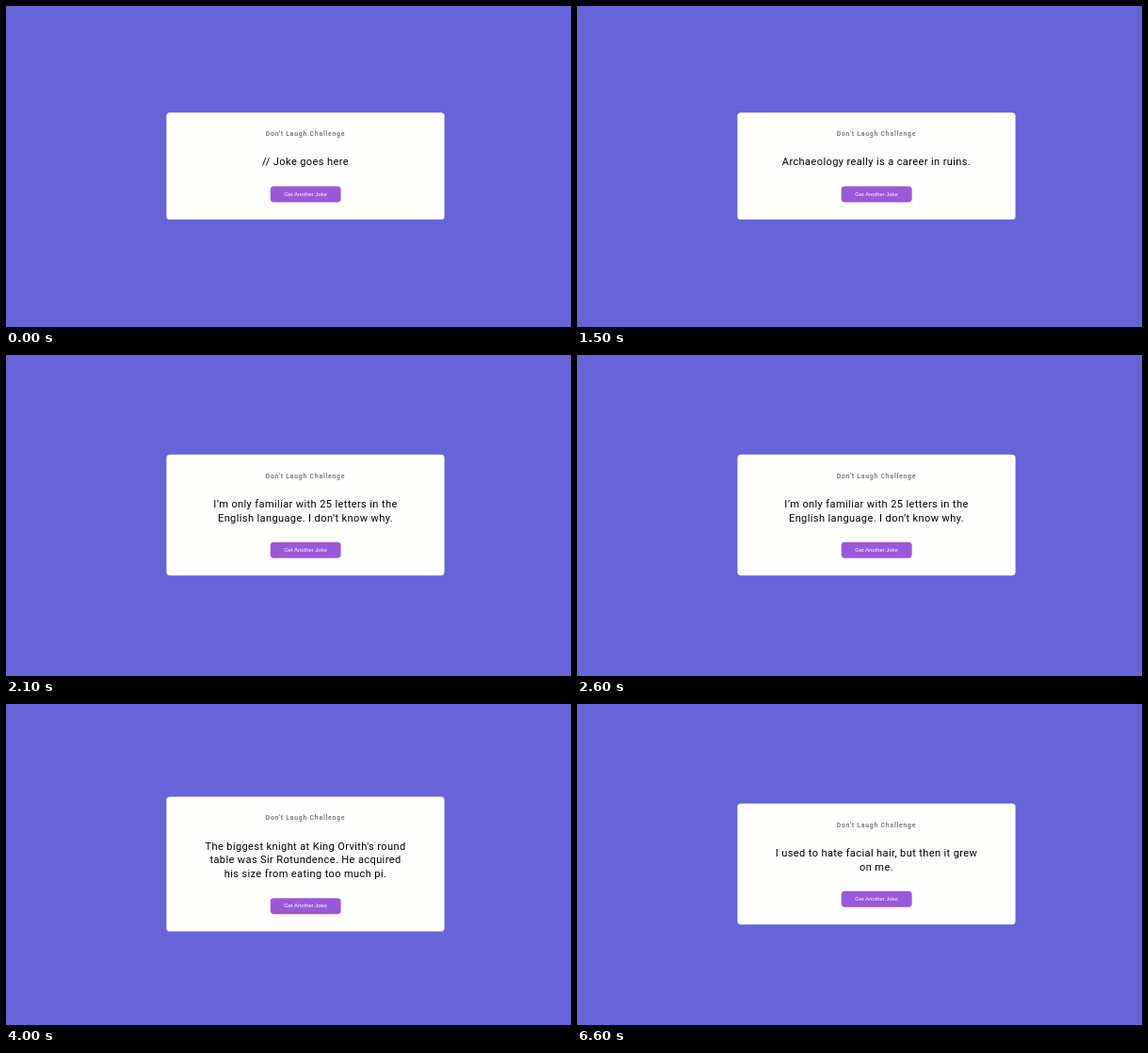
Write an HTML page that moves like this. It is 600x341 px and loops after 9.4 s.

```html
<!DOCTYPE html>
<html lang="en">
<head>
<meta charset="utf-8">
<title>Don't Laugh Challenge</title>
<style>
  html, body {
    margin: 0;
    width: 100%;
    height: 100%;
    overflow: hidden;
    background: #6763d9;
  }
  .card {
    position: absolute;
    left: 317.5px;
    top: 169.6px;
    box-sizing: border-box;
    width: 800px;
    padding: 50px 20px;
    border-radius: 10px;
    background: #fefefd;
    color: #000;
    font-family: Roboto, sans-serif;
    text-align: center;
    transform: scale(.369) translate(-50%, -50%);
    transform-origin: 0 0;
  }
  h3 {
    margin: 0;
    font-size: 18.72px;
    font-weight: 700;
    line-height: 22px;
    letter-spacing: 2px;
    opacity: .5;
  }
  .joke {
    margin: 50px 0;
    font-size: 30px;
    line-height: 40px;
    letter-spacing: 1px;
    white-space: pre;
  }
  .btn {
    display: block;
    box-sizing: border-box;
    width: 203px;
    height: 46px;
    margin: 0 auto;
    padding: 14px 0;
    border: 0;
    border-radius: 10px;
    background: #9b58d8;
    color: #fff;
    font: 16px/18px "Liberation Sans", Arial, sans-serif;
    white-space: nowrap;
  }
</style>
</head>
<body>
<div class="card">
  <h3>Don't Laugh Challenge</h3>
  <div class="joke">// Joke goes here</div>
  <button class="btn" type="button">Get Another Joke</button>
</div>
<script>
  const LOOP = 9400;
  const PRESS = 100;   // how long the button stays down
  const REPLY = 500;   // delay from click to new joke
  const clicks = [1000, 1600, 3500, 6100];
  const jokes = [
    "// Joke goes here",
    "Archaeology really is a career in ruins.",
    "I’m only familiar with 25 letters in the\nEnglish language. I don’t know why.",
    "The biggest knight at King Orvith's round\ntable was Sir Rotundence. He acquired\nhis size from eating too much pi.",
    "I used to hate facial hair, but then it grew\non me."
  ];
  const joke = document.querySelector(".joke");
  const btn = document.querySelector(".btn");
  let shown = 0;

  function draw(t) {
    const index = clicks.filter(c => t >= c + REPLY).length;
    const down = clicks.some(c => t >= c && t < c + PRESS);
    if (index !== shown) {
      joke.textContent = jokes[index];
      shown = index;
    }
    btn.style.transform = down ? "scale(.98)" : "none";
  }

  const start = performance.now();
  function tick() {
    draw((performance.now() - start) % LOOP);
    requestAnimationFrame(tick);
  }
  tick();
</script>
</body>
</html>
```
